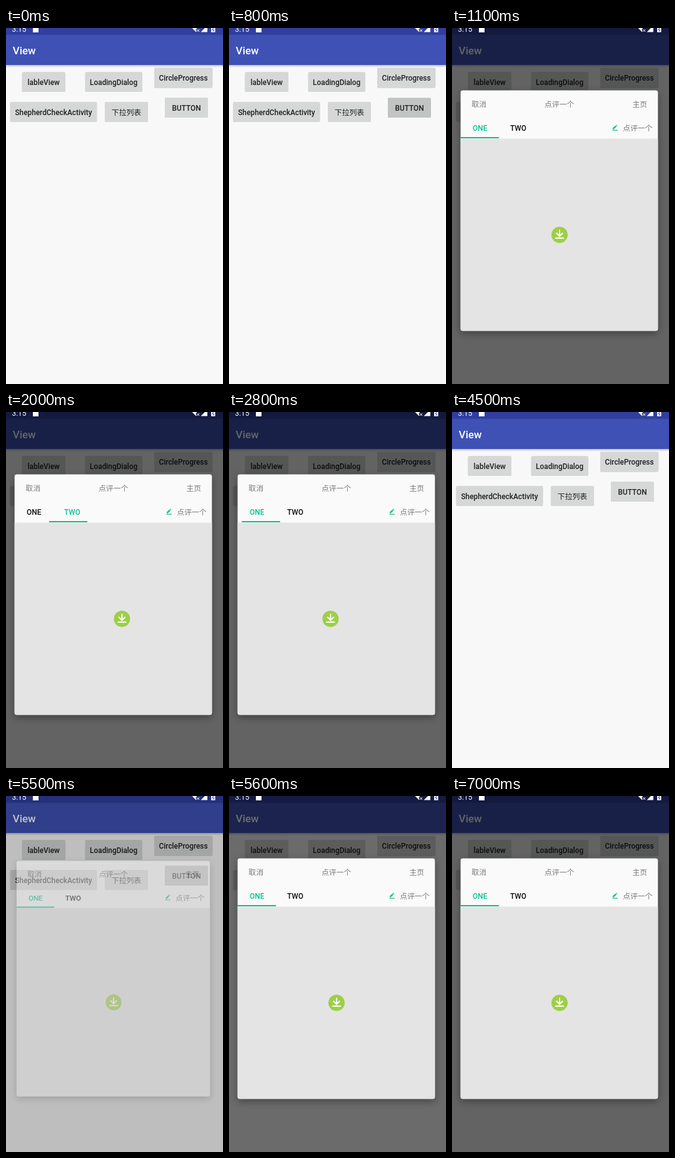
An HTML page for the animation above (7.4 s loop, 347 by 568 pixels).

```html
<!DOCTYPE html>
<html lang="zh-CN">
<head>
<meta charset="utf-8">
<title>View</title>
<style>
  html, body { margin: 0; width: 100%; height: 100%; overflow: hidden; background: #f8f8f8; }
  svg { display: block; width: 347px; height: 568px; }
  text { font: 400 11.85px Roboto, "Noto Sans CJK SC", "Noto Sans CJK", sans-serif; }
  .mid { text-anchor: middle; }
  .strong { font-weight: 500; }
  .soft { fill: #7b7b7b; }
  #buttons rect { fill: #d6d7d7; filter: drop-shadow(0 .8px .6px rgba(0, 0, 0, .22)); }
  #buttons text { fill: #1f1f1f; }
  #card { filter: drop-shadow(0 4px 6px rgba(0, 0, 0, .35)); }
  #dialog { transform-origin: 172px 292px; }
</style>
</head>
<body>
<svg viewBox="0 0 347 568">
  <defs>
    <linearGradient id="shade" x2="0" y2="1">
      <stop stop-opacity=".22"/>
      <stop offset="1" stop-opacity="0"/>
    </linearGradient>
    <clipPath id="pager"><rect x="13.7" y="176" width="315.6" height="307"/></clipPath>
    <g id="download">
      <circle r="13" fill="#9dcf48"/>
      <path d="M0-8V1.5M-5.3-3L0 2.3 5.3-3M-7 5.3H7" fill="none" stroke="#fff" stroke-width="2"/>
    </g>
  </defs>

  <rect width="347" height="568" fill="#f8f8f8"/>
  <rect y="59" width="347" height="4" fill="url(#shade)"/>
  <rect width="347" height="59" fill="#3f51b5"/>
  <rect width="347" height="11" fill="#303f9f"/>
  <text class="strong" x="10.8" y="42" fill="#fff" style="font-size:16.9px">View</text>
  <g id="buttons"></g>

  <rect id="dim" width="347" height="568"/>
  <g fill="#fff">
    <text x="9.5" y="6.3">3:15</text>
    <path d="M43 0h9v7h-9zM297.5 0h8l-2 2.5 1.2 2.5-1 1.3zM311.5 6.5L322 -4V6.5zM328 -2h6.5v8.8H328z"/>
    <path d="M305.5 2.2l3.6 3.8M309.1 2.2l-3.6 3.8" stroke="#fff"/>
    <path d="M331.8 0l-2 3h2.8l-1.6 2.8" fill="none" stroke="#303f9f"/>
  </g>

  <g id="dialog">
    <rect id="card" x="13.7" y="99.6" width="315.6" height="383.6" rx="3.5" fill="#fafafa"/>
    <path d="M13.7 176.4H329.3V479.7a3.5 3.5 0 0 1-3.5 3.5H17.2a3.5 3.5 0 0 1-3.5-3.5z" fill="#e4e4e4"/>
    <text class="soft" x="31.3" y="125.5">取消</text>
    <text class="soft mid" x="171.7" y="125.5">点评一个</text>
    <text class="soft" x="288.5" y="125.5">主页</text>
    <text class="soft" x="273.3" y="164">点评一个</text>
    <path d="M257 161.6v-1.8l4.1-4.1 1.8 1.8-4.1 4.1zM261.7 155.1l.9-.9 1.8 1.8-.9.9zM256.5 162.6h8.3v1.1h-8.3z" fill="#0fbe92"/>
    <text class="tab strong mid" x="44.7" y="164">ONE</text>
    <text class="tab strong mid" x="106" y="164">TWO</text>
    <rect id="bar" y="174" width="61.3" height="2" fill="#0abf93"/>
    <g clip-path="url(#pager)">
      <g id="pages">
        <use href="#download" x="172" y="330"/>
        <use href="#download" x="487" y="330"/>
      </g>
    </g>
  </g>
</svg>
<script>
const LOOP = 7400, TICK = 100, CLOSE = 4500;
const PAGE_W = 315, TAB_X = 13.8, TAB_W = 61.4, BAR_LAG = 58;
const $ = id => document.getElementById(id);

// label, x, y, width
const buttons = [
  ['lableView', 25.7, 70.4, 69], ['LoadingDialog', 126.7, 70.4, 91],
  ['CircleProgress', 237, 63.8, 93.2], ['ShepherdCheckActivity', 6.7, 118.2, 138.6],
  ['下拉列表', 158, 118.2, 69], ['BUTTON', 254, 111.5, 69]
];
$('buttons').innerHTML = buttons.map(([label, x, y, w]) =>
  `<rect x="${x}" y="${y}" width="${w}" height="31.6" rx="1.7"/>
   <text class="mid ${label > '~' ? '' : 'strong'}" x="${x + w / 2}" y="${y + 20.3}">${label}</text>`).join('');
const pressed = $('buttons').querySelector('rect:last-of-type');
const tabs = document.querySelectorAll('.tab');

// drag start, release, share dragged, settle time, target page
const swipes = [
  [1600, 1800, .45, 500, 1],
  [2500, 2600, .022, 400, 0],
  [3200, 3400, .137, 500, 1],
  [CLOSE, CLOSE, 1, 1, 0],
  [6000, 6100, .023, 500, 1],
  [6600, 6600, 0, 400, 0]
];

function pageAt(t) {
  let page = 0;
  for (const [start, release, share, settle, to] of swipes) {
    if (t <= start) break;
    const done = t < release
      ? share * ((t - start) / (release - start)) ** 2
      : 1 - (1 - share) * (1 - Math.min(1, (t - release) / settle)) ** 5;
    page = to ? done : 1 - done;
  }
  return page;
}

function selectedAt(t) {
  const last = swipes.filter(s => t > s[1]).pop();
  return last ? last[4] : 0;
}

function draw(now) {
  const t = Math.floor(now % LOOP / TICK) * TICK;
  const age = t < CLOSE ? t - 900 : t - 5430;
  const open = age > 0;
  const down = t >= 800 && t < CLOSE || t >= 5200;

  pressed.style.fill = down ? '#c2c3c3' : '';
  $('dim').style.opacity = open ? .6 * Math.min(1, age / 180) : 0;

  const dialog = $('dialog').style;
  dialog.display = open ? '' : 'none';
  dialog.opacity = Math.min(1, age / 150);
  dialog.transform = age < 170 ? `scale(${1 - .1 * (1 - Math.max(0, age) / 170) ** 3})` : 'none';

  $('pages').setAttribute('transform', `translate(${-PAGE_W * pageAt(t)} 0)`);
  $('bar').setAttribute('x', TAB_X + TAB_W * pageAt(t - BAR_LAG));
  tabs.forEach((tab, i) => tab.style.fill = i === selectedAt(t) ? '#0abf93' : '#0c0c0c');
}

const begin = performance.now();
function loop() {
  draw(performance.now() - begin);
  requestAnimationFrame(loop);
}
loop();
</script>
</body>
</html>
```
